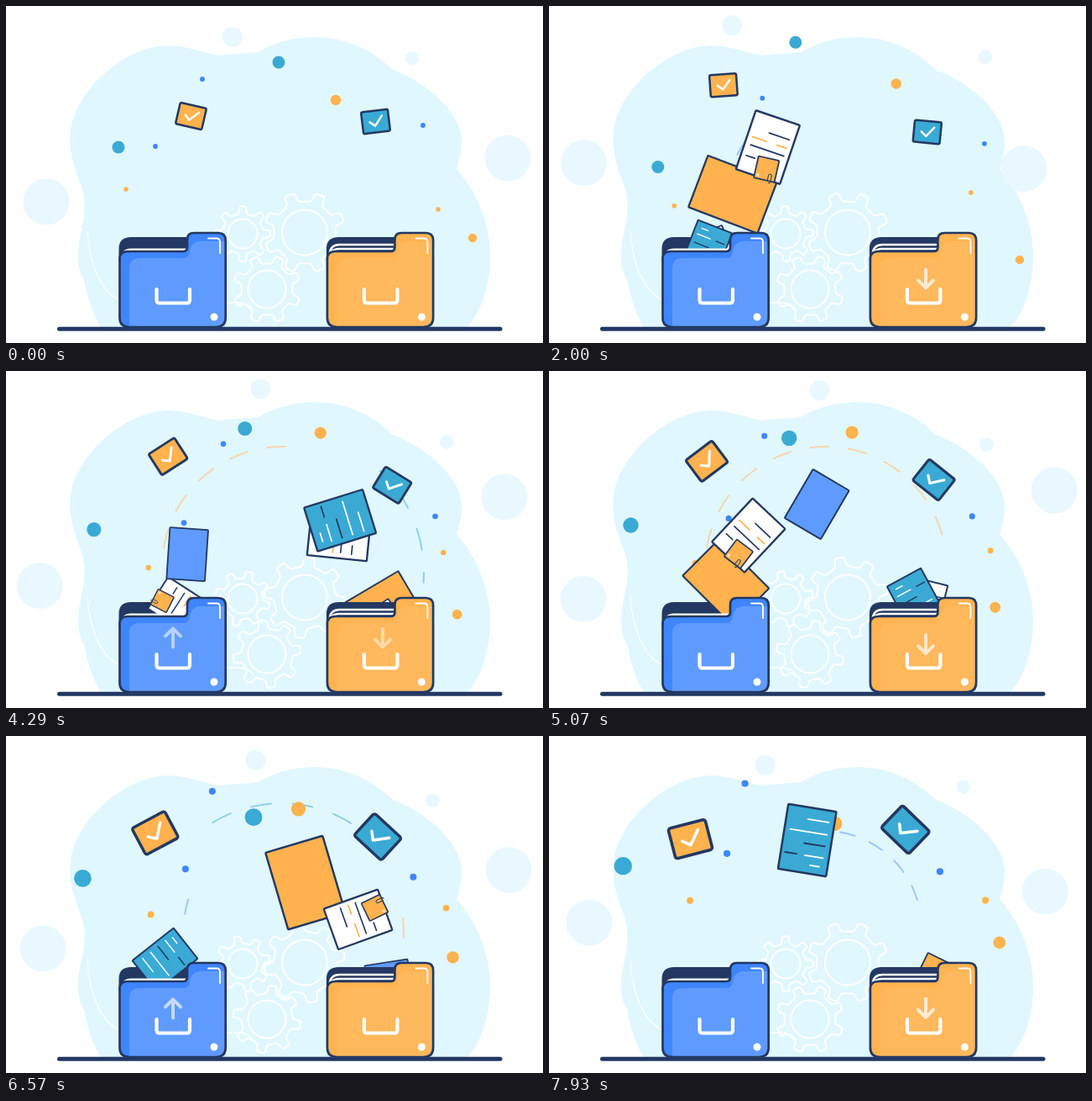
Animation, 640 px wide and 401 px high, one loop 8 s. Source, as an HTML page with a canvas:

```html
<!DOCTYPE html>
<html lang="en">
<head>
<meta charset="utf-8">
<title>File transfer</title>
<style>
html, body { margin: 0; width: 100%; height: 100%; overflow: hidden; background: #fff; }
canvas { display: block; width: 100vw; height: 100vh; }
</style>
</head>
<body>
<canvas id="stage" width="640" height="401"></canvas>
<script>
const LOOP = 8000;
const NAVY = '#233862', BLUE = '#5f9bff', DEEP_BLUE = '#3f85fc', ORANGE = '#ffb24d',
      TEAL = '#3aaad4', PALE = '#e9f8ff', WHITE = '#fff';
const ctx = document.getElementById('stage').getContext('2d');
const rad = deg => deg * Math.PI / 180;
const clamp01 = v => Math.min(1, Math.max(0, v));

function stroke(path, color, width) {
  ctx.strokeStyle = color;
  ctx.lineWidth = width;
  ctx.stroke(new Path2D(path));
}
function fill(path, color) {
  ctx.fillStyle = color;
  ctx.fill(new Path2D(path));
}
function placed(x, y, deg, scale, draw) {
  ctx.save();
  ctx.translate(x, y);
  ctx.rotate(rad(deg));
  ctx.scale(scale, scale);
  draw();
  ctx.restore();
}
function disc(x, y, r, color) {
  ctx.fillStyle = color;
  ctx.beginPath();
  ctx.arc(x, y, r, 0, 7);
  ctx.fill();
}
function box(w, h, color, radius = 1, line = 2.5) {
  ctx.beginPath();
  ctx.roundRect(-w / 2, -h / 2, w, h, radius);
  ctx.fillStyle = color;
  ctx.fill();
  ctx.strokeStyle = NAVY;
  ctx.lineWidth = line;
  ctx.stroke();
}

// Floating things drift smoothly through a start, two turning points and an end.
const TURNS = [0, 2300, 5000, LOOP];
function drift(points, t) {
  const last = TURNS.length - 1;
  const i = Math.max(0, TURNS.findIndex(time => time > t) - 1);
  const span = TURNS[i + 1] - TURNS[i], u = (t - TURNS[i]) / span;
  return points[0].map((_, c) => {
    const slope = k => {
      const from = Math.max(0, k - 1), to = Math.min(last, k + 1);
      return (points[to][c] - points[from][c]) / (TURNS[to] - TURNS[from]) * span;
    };
    const a = points[i][c], d = points[i + 1][c] - a, m = slope(i), n = slope(i + 1);
    return a + u * (m + u * (3 * d - 2 * m - n + u * (m + n - 2 * d)));
  });
}
function growth(t) {
  const u = clamp01((t - 2200) / 5400);
  return 1 + 0.42 * u * u * (3 - 2 * u);
}
const bubble = (t, r, ...points) => disc(...drift(points, t), r, PALE);
const dot = (t, color, r, ...points) => disc(...drift(points, t), r * growth(t), color);
function card(t, color, ...points) {
  placed(...drift(points, t), growth(t), () => {
    box(32, 26, color, 2);
    stroke('M-7 0L-1 5L8 -6', WHITE, 2.5);
  });
}
function drawBubbles(t) {
  bubble(t, 27.5, [48, 233], [41, 187], [41, 271], [48, 221]);
  bubble(t, 27.5, [598, 181], [565, 192], [602, 142], [591, 186]);
  bubble(t, 12, [270, 37], [219, 22], [322, 23], [256, 35]);
  bubble(t, 8.3, [484, 62], [523, 62], [522, 88], [493, 60]);
}
function drawDots(t) {
  dot(t, TEAL, 7.5, [325, 67], [291, 43], [286, 79], [306, 112]);
  dot(t, TEAL, 7.5, [134, 168], [128, 193], [98, 184], [88, 154]);
  dot(t, DEEP_BLUE, 2.9, [234, 87], [256, 110], [257, 78], [233, 56]);
  dot(t, DEEP_BLUE, 2.9, [178, 167], [201, 184], [214, 176], [212, 139]);
  dot(t, DEEP_BLUE, 2.9, [497, 142], [520, 166], [505, 173], [465, 161]);
  dot(t, ORANGE, 6.2, [393, 112], [413, 90], [362, 73], [340, 105]);
  dot(t, ORANGE, 2.8, [143, 218], [151, 239], [174, 229], [168, 195]);
  dot(t, ORANGE, 2.8, [515, 242], [503, 220], [526, 214], [520, 195]);
  dot(t, ORANGE, 5.2, [556, 276], [560, 303], [532, 282], [537, 245]);
}
function drawCards(t) {
  card(t, ORANGE, [220.5, 131, 13], [206, 92, -7], [188.5, 107, -37], [168, 123, -14]);
  card(t, TEAL, [440.5, 137.5, -7], [452, 150, 8], [459, 130, 38], [424, 111, 44]);
}

// Dashed trails: a window slides along each arc at a steady rate.
function trail(t, color, x, y, r, first, start, lag) {
  const head = 180 + 0.105 * (t - start), tail = head - 0.105 * lag;
  ctx.strokeStyle = color;
  ctx.lineWidth = 2;
  for (let a = first; a < 362; a += 18.2) {
    const from = Math.max(a, tail), to = Math.min(a + 8.8, head, 364);
    if (from >= to) continue;
    ctx.beginPath();
    ctx.arc(x, y, r, rad(from), rad(to));
    ctx.stroke();
  }
}
function drawTrails(t) {
  const sky = '#8ed0e6', periwinkle = '#9fc4ff', sand = '#f3d7ae';
  for (const start of [1550, 6325]) trail(t, periwinkle, 328, 229, 116, 188.5, start, 700);
  trail(t, sky, 331, 240, 167, 178, 2390, 630);
  trail(t, sand, 330, 234, 144, 189.6, 3420, 1580);
  trail(t, sky, 328, 237, 157, 184, 5410, 650);
}

function drawPage() {
  box(57, 76, WHITE);
  stroke('M-4 -17H22M-21 4H22M-22 18H-11', NAVY, 1.8);
  stroke('M-22 -6H-4M10 -6H22', ORANGE, 1.8);
}
function drawPocketPage() {
  drawPage();
  placed(7, 26, -6, 1, () => {
    box(26, 27, ORANGE, 1, 1.8);
    disc(-9, 9, 2, '#ffe3bb');
    stroke('M4 14V8Q4 5 6 5T8 8V14Q8 16 6 16', NAVY, 1);
  });
}
function drawTeal() {
  box(58, 78, TEAL);
  stroke('M-3 -25H22M-22 -10H22M0 18H22M8 29H19', WHITE, 1.8);
  stroke('M-3 4H22M-24 18H-10', NAVY, 1.8);
}
const drawSheet = () => box(73, 98, ORANGE);
const drawSlip = () => box(50, 67, BLUE, 1, 2);

// Each document rises from the left folder and sinks into the right one.
// x holds Bezier controls, lift the control height, apex the times at mid-flight.
const flights = [
  { draw: drawSheet, x: [200, 211, 359, 475], lift: 237, turn: 25, spin: -0.101, apex: [2850, 6160] },
  { draw: drawPage, x: [200, 172, 415, 460], lift: 241, turn: -18, spin: -0.105, apex: [3660] },
  { draw: drawTeal, x: [187, 175, 430, 445], lift: 276, turn: 8, spin: 0.101, apex: [3650, 7920] },
  { draw: drawPocketPage, x: [200, 216, 411, 460], lift: 248, turn: -24, spin: -0.102, apex: [2420, 5730] },
  { draw: drawSlip, x: [200, 169, 457, 460], lift: 230, turn: 30, spin: 0.034, apex: [5060] },
];
function drawDocuments(t) {
  for (const { draw, x: [a, b, c, d], lift, turn, spin, apex } of flights) {
    for (const mid of apex) {
      const u = 1 / (1 + Math.exp((mid - t) / 570)), v = 1 - u;
      const x = a * v ** 3 + 3 * u * v * (b * v + c * u) + d * u ** 3;
      const y = 331 - 3 * u * v * lift;
      placed(x, y, turn + spin * (t - mid), 0.55 + 0.9 * Math.sqrt(u * v), draw);
    }
  }
}

function drawGear(x, y, body, tip, hole, turn) {
  const points = [];
  for (let i = 0; i < 8; i++) {
    for (const [offset, r] of [[-11, body], [-7, tip], [7, tip], [11, body]]) {
      const a = rad(turn + i * 45 + offset);
      points.push([x + r * Math.cos(a), y + r * Math.sin(a)]);
    }
  }
  const n = points.length, [a, b] = [points[n - 1], points[0]];
  ctx.strokeStyle = WHITE;
  ctx.lineWidth = 2;
  ctx.beginPath();
  ctx.moveTo((a[0] + b[0]) / 2, (a[1] + b[1]) / 2);
  points.forEach((p, i) => ctx.arcTo(...p, ...points[(i + 1) % n], tip * 0.08));
  ctx.closePath();
  ctx.stroke();
  ctx.beginPath();
  ctx.arc(x, y, hole, 0, 7);
  ctx.stroke();
}
function drawBackdrop(t) {
  fill('M113 382C104 368 98 350 93 326C82 306 86 285 91 262C94 246 95 232 90 215C80 190 75 172 77 152' +
    'C79 105 138 48 193 47C216 47 238 57 255 59C270 56 286 57 300 55C322 42 346 37 369 37' +
    'C405 37 438 53 461 76C505 92 543 130 543 160C543 174 540 185 537 194C562 222 577 260 577 297' +
    'C577 332 567 364 550 382Z', '#e0f7fe');
  stroke('M97 268C99 305 112 340 136 350M262 353H277Q290 354 294 361', WHITE, 1.3);
  const turn = t * 0.0908;
  drawGear(282, 271, 24.5, 33, 17.5, -turn);
  drawGear(356, 269.5, 37.5, 48.5, 27, 22.5 + turn);
  drawGear(311, 337, 31, 40.5, 22.5, 22 - turn);
}

const FRONT = 'M135.5 301Q135.5 292 145 292H211Q216 292 216 287V278Q216 270 224 270H253' +
  'Q261.7 270 261.7 279V371Q261.7 382 250 382H147Q135.5 382 135.5 371Z';

function drawFolderBack() {
  fill('M134.5 304V289Q134.5 275 149 275H220V304Z', NAVY);
}
function drawFolderFront(color, light) {
  fill(FRONT, color);
  fill('M147 382V312Q147 300 159 300H212Q218 300 219 292Q221 280 232 280H261V372Q261 382 250 382Z', light);
  stroke(FRONT, NAVY, 2.7);
  stroke('M241 276.5H251Q255 276.5 255 281V294', WHITE, 1.8);
  stroke('M179.5 337V350Q179.5 353.5 183 353.5H215.5Q219 353.5 219 350V337', WHITE, 4.2);
  disc(248, 370, 4.5, WHITE);
}
function drawArrow(x, y, direction, progress) {
  if (progress <= 0 || progress >= 1) return;
  ctx.save();
  ctx.globalAlpha = 0.75 * Math.sin(Math.PI * progress);
  ctx.translate(x, y + direction * 17 * progress);
  ctx.scale(1, direction);
  stroke('M0 -11V11M-9 2L0 11L9 2', WHITE, 4);
  ctx.restore();
}
function drawArrows(t) {
  const phase = t % 3000;
  drawArrow(199, 330, -1, phase / 1750);
  drawArrow(449, 314, 1, (phase - 900) / 1800);
}

function render(t) {
  ctx.clearRect(0, 0, 640, 401);
  ctx.lineCap = ctx.lineJoin = 'round';
  drawBackdrop(t);
  drawBubbles(t);
  drawTrails(t);
  drawDots(t);
  drawCards(t);
  drawFolderBack();
  drawDocuments(t);

  stroke('M138 303Q138 290 149 290H215', WHITE, 3);
  drawFolderFront(DEEP_BLUE, BLUE);
  ctx.save();
  ctx.translate(247.4, 0);
  drawFolderBack();
  stroke('M138 296Q139 284 150 284H215M138 303Q138 289 149 289H215', WHITE, 2.4);
  drawFolderFront('#ffb351', '#ffb85c');
  ctx.restore();
  drawArrows(t);
  stroke('M63.5 384.3H589', NAVY, 5);
}

const started = performance.now();
function tick() {
  render((performance.now() - started) % LOOP);
  requestAnimationFrame(tick);
}
tick();
</script>
</body>
</html>
```
